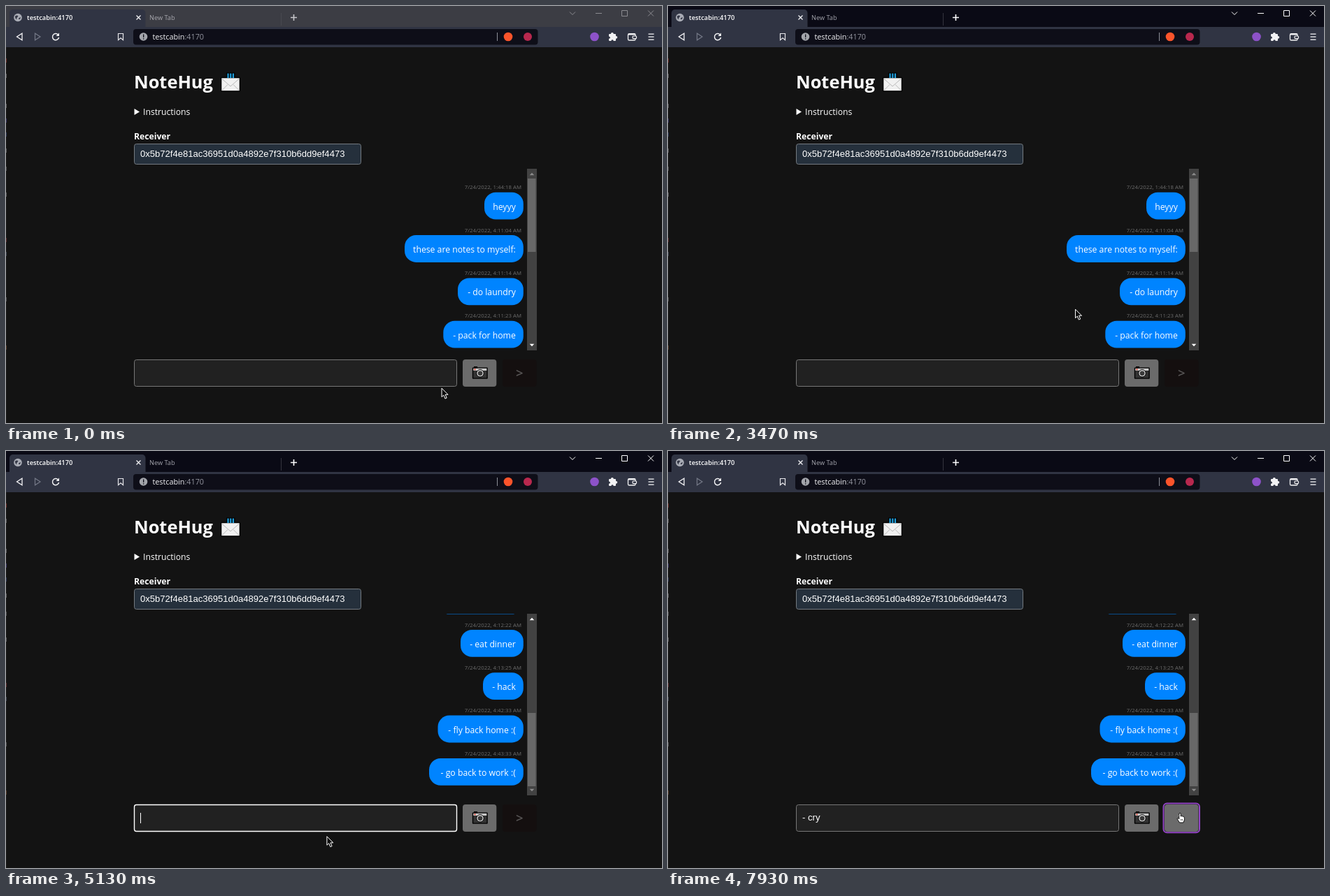
These frames come from a looping animation (938x597 px, 8000 ms). An HTML page with a canvas:

```html
<!DOCTYPE html>
<html lang="en">
<head>
<meta charset="utf-8">
<title>NoteHug</title>
<style>
html, body { margin: 0; width: 100%; height: 100%; overflow: hidden; background: #131313; }
canvas { display: block; width: 938px; height: 597px; }
</style>
</head>
<body>
<canvas id="stage" width="938" height="597"></canvas>
<script>
const ctx = document.getElementById('stage').getContext('2d');
const LOOP = 8000, STEP = 200 / 3;
const SANS = '"Open Sans", "Noto Sans", sans-serif';
const ARIAL = '"Liberation Sans", Arial, sans-serif';

const messages = [
  ['1:44:18', 'heyyy', 684],
  ['4:11:04', 'these are notes to myself:', 570],
  ['4:11:14', '- do laundry', 646],
  ['4:11:23', '- pack for home', 625.3],
  ['4:11:33', '- wear deodorant', 617],
  ['4:12:22', '- eat dinner', 650],
  ['4:13:25', '- hack', 682],
  ['4:42:33', '- fly back home :(', 617.5],
  ['4:43:33', '- go back to work :(', 605],
];

// Tracks: [time, value...]
const scrollKeys = [[3730, 0], [3800, 42], [3870, 135], [3930, 229.4], [4000, 291], [4070, 317.3]];
const pointerKeys = [
  [670, 622.5, 546.5], [730, 615, 545], [800, 583, 537], [870, 548, 529], [930, 533.5, 525.5],
  [1400, 533.5, 525.5], [1470, 543, 500], [1530, 569, 425], [1600, 581.5, 393],
  [3200, 581.5, 393], [3270, 582, 416], [3330, 582, 433.5],
  [4330, 582, 433.5], [4530, 550, 468], [4730, 478, 517], [4930, 446, 528],
  [5070, 454, 543], [5200, 463.5, 560.5],
  [7000, 463.5, 560.5], [7130, 492, 568], [7270, 556, 570.5], [7470, 650, 556],
  [7670, 716, 537], [7870, 729, 526], [7930, 732, 518],
];
const typed = [[5730, '-'], [5800, '- '], [6000, '- c'], [6270, '- cr'], [6530, '- cry']];
const ACTIVATE = 3470, FOCUS = 4930, ENABLE = 5730, SEND = 7670;

function track(keys, t) {
  if (t <= keys[0][0]) return keys[0].slice(1);
  for (let i = 1; i < keys.length; i++) {
    const a = keys[i - 1], b = keys[i];
    if (t <= b[0]) {
      const p = (t - a[0]) / (b[0] - a[0]);
      return a.slice(1).map((v, j) => v + (b[j + 1] - v) * p);
    }
  }
  return keys[keys.length - 1].slice(1);
}

function rect(x, y, w, h, color) {
  ctx.fillStyle = color;
  ctx.fillRect(x, y, w, h);
}

function box(x, y, w, h, r, fill, stroke, width = 1) {
  ctx.beginPath();
  ctx.roundRect(x, y, w, h, r);
  paint(fill, stroke, width);
}

function disc(x, y, r, fill, stroke, width = 1) {
  ctx.beginPath();
  ctx.arc(x, y, r, 0, Math.PI * 2);
  paint(fill, stroke, width);
}

function shape(d, x, y, fill, stroke, width = 1) {
  ctx.save();
  ctx.translate(x, y);
  const p = new Path2D(d);
  if (fill) { ctx.fillStyle = fill; ctx.fill(p); }
  if (stroke) { ctx.strokeStyle = stroke; ctx.lineWidth = width; ctx.stroke(p); }
  ctx.restore();
}

function paint(fill, stroke, width) {
  if (fill) { ctx.fillStyle = fill; ctx.fill(); }
  if (stroke) { ctx.strokeStyle = stroke; ctx.lineWidth = width; ctx.stroke(); }
}

function text(str, x, y, size, color, { weight = 400, family = SANS, align = 'left' } = {}) {
  ctx.font = `${weight} ${size}px ${family}`;
  ctx.fillStyle = color;
  ctx.textAlign = align;
  ctx.fillText(str, x, y);
  return ctx.measureText(str).width;
}

function globe(x, y) {
  disc(x, y, 5.8, '#a9acb5');
  shape('M-4 -2 Q-1 -4 0.5 -2 L-1.5 0.5 L-2 3 Q-4.5 1 -4 -2 M1.5 0.5 L4 -0.5 L3 2.5 L1 2.5Z', x, y, '#343746');
}

function drawTabs(active) {
  const ink = active ? '#ffffff' : '#8b8b90';
  const plus = active ? '#ffffff' : '#c6c6ca';
  rect(0, 0, 938, 31, active ? '#0a0a15' : '#3c3d44');
  box(5, 5, 194.5, 27, [5, 5, 0, 0], '#303443');
  globe(17, 16.5);
  text('testcabin:4170', 30, 20, 9.3, '#ffffff', { weight: 600 });
  shape('M-3 -3 L3 3 M3 -3 L-3 3', 189.5, 16.5, null, '#f0f0f3', 1.3);
  text('New Tab', 205, 20, 9.2, active ? '#a3a4ac' : '#a8a8ae');
  rect(393, 10, 1, 18, active ? '#34343e' : '#484950');
  shape('M-4.5 0 H4.5 M0 -4.5 V4.5', 411.5, 16.5, null, plus, 1.6);
  shape('M-4 -2 L0 2 L4 -2', 810, 10.5, null, ink);
  shape('M-4.5 0 H4.5', 847.5, 10.5, null, ink);
  shape('M-4 -4 H4 V4 H-4 Z', 884.5, 10.5, null, ink);
  shape('M-4 -4 L4 4 M4 -4 L-4 4', 922, 10.5, null, ink);
}

function drawToolbar() {
  const white = '#f2f2f4';
  rect(0, 30, 938, 29, '#303443');
  shape('M3.5 -4.8 V4.8 L-4 0 Z', 19.5, 44, null, white, 1.3);
  shape('M-3.5 -4.8 V4.8 L4 0 Z', 45, 44, null, '#747886', 1.2);
  shape('M3.4 -3 A4.6 4.6 0 1 0 4.6 1', 71, 44, null, white, 1.5);
  shape('M5 -5.5 V-1 H0.5 Z', 71, 44, white);
  shape('M-3.5 -4.5 H3.5 V4.8 L0 1.8 L-3.5 4.8 Z', 164, 44, null, '#e6e6ea', 1.2);
  box(182, 33, 578.5, 22.5, 4, '#0e0e18');
  disc(196.5, 44, 5.8, '#a3a5ab');
  rect(196, 40.5, 1.3, 4.5, '#0e0e18');
  rect(196, 46.2, 1.3, 1.4, '#0e0e18');
  const w = text('testcabin', 209.5, 48, 10.8, white);
  text(':4170', 209.5 + w, 48, 10.8, '#9496a0');
  rect(702, 38, 1, 12, '#8d8f98');
  disc(718, 44, 6.3, '#fb542b');
  disc(746, 44, 6, '#b8284e');
  disc(841.5, 44, 6.3, '#8d52c9');
  box(862, 40, 10, 10, 1, white);
  disc(866.8, 39.8, 1.9, white);
  disc(872.3, 44.8, 1.9, white);
  disc(862.2, 45.2, 1.6, '#303443');
  disc(867, 49.8, 1.6, '#303443');
  box(889.5, 39.7, 10.5, 9.3, 1.6, null, white, 1.3);
  rect(890, 40, 10, 1.5, white);
  box(896, 43, 5.5, 3.6, 1, '#303443', white, 1.2);
  for (const y of [39.5, 43.5, 47.5]) rect(918.5, y, 8, 1.3, white);
}

function drawEdge() {
  const marks = [[75, '#a33d36'], [97, '#88888c'], [140, '#88888c'], [161, '#514b9c'], [181, '#3f4d82'],
    [204, '#88888c'], [230, '#77777c'], [267, '#88888c'], [332, '#8d3f42'], [352, '#58617a'], [417, '#77777c'], [486, '#7d5236']];
  rect(0, 59, 1, 538, '#1c1c1c');
  ctx.globalAlpha = 0.6;
  for (const [y, c] of marks) rect(0, y, 1, 6, c);
  ctx.globalAlpha = 1;
}

function drawHeader() {
  text('NoteHug', 183, 118, 25.4, '#ffffff', { weight: 700 });
  rect(315, 95.5, 12.5, 8, '#000000');
  box(307.5, 102.5, 27, 19.5, 1, '#f1f1f1', '#000000', 1.6);
  for (let i = 0; i < 3; i++) rect(316.4 + i * 3.7, 96.5, 2.3, 6.5, '#1f9ad6');
  shape('M-12.5 8.5 L-4 0 M12.5 8.5 L4 0 M-12.5 -8.5 L0 2.5 L12.5 -8.5', 321, 112.5, null, '#b9b9b9');
  shape('M0 0 L7.5 4.5 L0 9 Z', 183.5, 147, '#ffffff');
  text('Instructions', 196, 156, 12.2, '#ffffff');
  text('Receiver', 183, 190.5, 12.2, '#ffffff', { weight: 700 });
  box(183.5, 197.5, 324, 29, 3, '#25303c', '#747a80');
  text('0x5b72f4e81ac36951d0a4892e7f310b6dd9ef4473', 192, 215.7, 13.05, '#ffffff', { family: ARIAL });
}

function drawChat(scroll) {
  ctx.save();
  ctx.beginPath();
  ctx.rect(183, 233, 576, 260);
  ctx.clip();
  messages.forEach(([time, body, left], i) => {
    const top = 266.8 + i * 61.3 - scroll;
    if (top < 190 || top > 505) return;
    text(`7/24/2022, ${time} AM`, 737, top - 4.4, 7.8, '#6c6c6c', { align: 'right' });
    box(left, top, 739.8 - left, 38.8, 16.4, '#0084ff');
    text(body, 728.8, top + 25, 12.22, '#ffffff', { align: 'right' });
  });
  rect(745, 233, 14, 260, '#424242');
  rect(746, 247 + scroll * 128 / 317.3, 11.5, 105, '#686868');
  shape('M-3.3 1.8 L0 -1.8 L3.3 1.8 Z', 752, 240.5, scroll > 0 ? '#ffffff' : '#8c8c8c');
  shape('M-3.3 -1.8 L0 1.8 L3.3 -1.8 Z', 752, 485.5, scroll < 317 ? '#ffffff' : '#8c8c8c');
  ctx.restore();
}

function drawCamera() {
  box(653, 506, 48.3, 39, 4, '#6b6b6b');
  rect(669, 516, 5, 3, '#000000');
  box(666.8, 517.5, 22, 16.3, 1, '#000000');
  rect(668.2, 518.8, 19.2, 3.2, '#c9c9c9');
  rect(669.5, 519.3, 2, 2, '#e0412f');
  rect(668.2, 522, 19.2, 10.5, '#333333');
  disc(678, 525.8, 5.2, '#dedede', '#000000', 1);
  disc(678, 525.8, 3.4, '#3a3a3a');
}

function drawComposer(t) {
  const focused = t >= FOCUS && t < SEND;
  const enabled = t >= ENABLE;
  const last = typed.filter(k => t >= k[0]).pop() || [FOCUS, ''];
  box(183.5, 506.5, 461, 38, 3, '#212121', focused ? '#ffffff' : '#777777', focused ? 1.4 : 1);
  const w = text(last[1], 192, 529.3, 13.1, '#ffffff', { family: ARIAL });
  if (focused && Math.floor((t - last[0]) / 533) % 2 === 0) rect(Math.round(192 + w), 518, 1, 15, '#ffffff');
  drawCamera();
  box(710, 506, 48.5, 39, 4, enabled ? '#6b6b6b' : '#140f0f');
  text('>', 734.2, 532, 18.5, enabled ? '#ffffff' : '#585656', { weight: 600, align: 'center' });
  if (t >= SEND) box(708.5, 504.5, 51.5, 41.8, 5, null, '#9244c4', 2);
}

function drawPointer(t) {
  const [x, y] = track(pointerKeys, t);
  const inside = (l, r) => x >= l && x <= r && y >= 506 && y <= 545;
  if (inside(183, 645)) {
    shape('M-3.5 -7.5 H-1 L0 -6.5 L1 -7.5 H3.5 M0 -6.5 V6.5 M-3.5 7.5 H-1 L0 6.5 L1 7.5 H3.5', x, y, null, '#f2f2f2', 1);
  } else if (inside(653, 701) || inside(710, 759)) {
    shape('M-1.2 1 Q0 -0.5 1.2 1 V5 L2.5 4.6 L4.5 5.2 L6.4 6.4 V10 L5 14 H-0.5 L-3.8 9 Q-4 7.4 -2.6 7.7 L-1.2 9 Z', x, y, '#ffffff', '#000000', 0.9);
    shape('M1.6 11 V9 M3.4 11 V9', x, y, null, '#000000', 0.7);
  } else {
    shape('M0.5 0.7 V13.2 L3.3 10.6 L5.4 15.6 L7.7 14.6 L5.6 9.8 H9.5 Z', x, y, '#0c0c0c', '#ffffff', 1);
  }
}

function draw(now) {
  const step = Math.floor((now % LOOP + 3.4) / STEP);
  const t = Math.round(step * STEP / 10) * 10 % LOOP;
  rect(0, 0, 938, 597, '#131313');
  drawTabs(t >= ACTIVATE);
  drawToolbar();
  drawEdge();
  drawHeader();
  drawChat(track(scrollKeys, t)[0]);
  drawComposer(t);
  drawPointer(t);
}

function tick() {
  draw(performance.now());
  requestAnimationFrame(tick);
}
tick();
</script>
</body>
</html>
```
